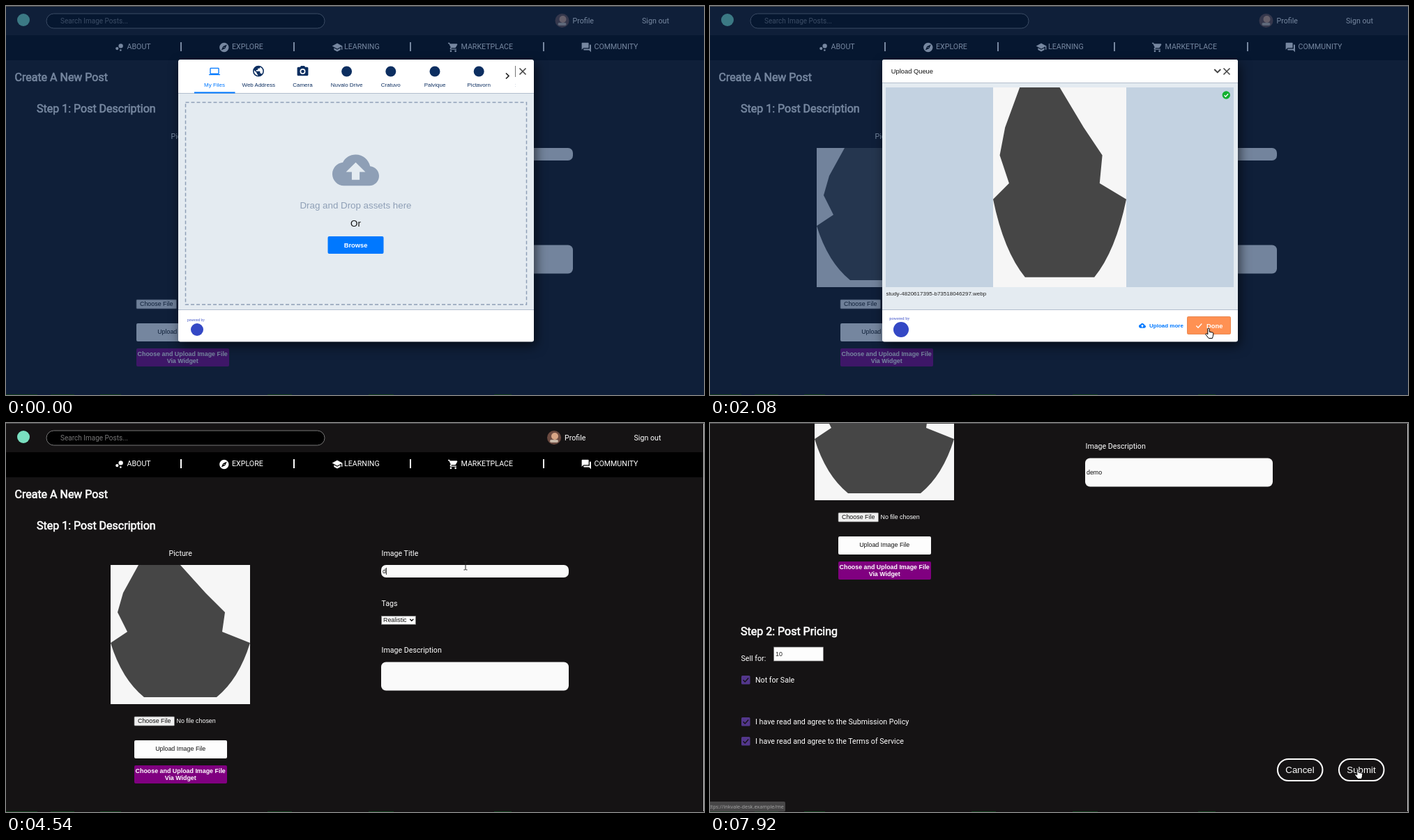
An HTML page that plays this animation: 1001x559 px, repeating every 8 s.

```html
<!DOCTYPE html>
<html lang="en">
<head>
<meta charset="utf-8">
<title>Create a post</title>
<style>
  html, body { margin: 0; width: 100%; height: 100%; overflow: hidden; background: #151314; }
  svg { display: block; }
  text { white-space: pre; }
  .ui { font-family: Roboto, sans-serif; }
  .sys { font-family: "Liberation Sans", Arial, sans-serif; }
  .head { font-family: Roboto, sans-serif; stroke: #fff; stroke-width: .6; }
  .status { font-family: "Open Sans", sans-serif; }
  .serif { font-family: "Liberation Serif", serif; }
  #modal { filter: drop-shadow(3px 6px 8px rgba(0, 0, 0, .6)); }
</style>
</head>
<body>
<svg id="stage" width="1001" height="559" viewBox="0 0 1001 559"></svg>
<script>
const LOOP = 8000, TICK = 120;
const NAVY = '#0c2e60', BLUE = '#0078ff', SLATE = '#8e9fb6', EM = 8.89;

const icons = {
  bubbles: 'M4 14.4a3.2 3.2 0 106.4 0 3.2 3.2 0 10-6.4 0zM12.8 18a2 2 0 104 0 2 2 0 10-4 0zM10.4 8.8a4.8 4.8 0 109.6 0 4.8 4.8 0 10-9.6 0z',
  compass: 'M12 10.9a1.1 1.1 0 100 2.2 1.1 1.1 0 100-2.2zM12 2a10 10 0 100 20 10 10 0 100-20zm2.2 12.2L6 18l3.8-8.2L18 6z',
  cap: 'M5 13.2v4L12 21l7-3.8v-4L12 17zM12 3L1 9l11 6 9-4.9V17h2V9z',
  cart: 'M7 18a2 2 0 100 4 2 2 0 100-4zM1 2v2h2l3.6 7.6-1.4 2.4C4.5 15.4 5.5 17 7 17h12v-2H7.4l1-2h7.4c.8 0 1.4-.4 1.8-1L21.2 5.5 20 4H5.2L4.3 2zM17 18a2 2 0 100 4 2 2 0 100-4z',
  forum: 'M21 6h-2v9H6v2c0 .6.4 1 1 1h11l4 4V7c0-.6-.4-1-1-1zm-4 6V3c0-.6-.4-1-1-1H3c-.6 0-1 .4-1 1v14l4-4h10c.6 0 1-.4 1-1z',
  cloud: 'M19.4 10C18.7 6.6 15.6 4 12 4 9.1 4 6.6 5.6 5.4 8 2.3 8.4 0 10.9 0 14c0 3.3 2.7 6 6 6h13c2.8 0 5-2.2 5-5 0-2.6-2-4.8-4.6-5zM14 13v4h-4v-4H7l5-5 5 5z',
  laptop: 'M20 18c1.1 0 2-.9 2-2V6c0-1.1-.9-2-2-2H4c-1.1 0-2 .9-2 2v10c0 1.1.9 2 2 2H0v2h24v-2zM4 6h16v10H4z',
  globe: 'M12 2a10 10 0 100 20 10 10 0 100-20zm-1 17.9A8 8 0 014.2 10.2L9 15v1c0 1.1.9 2 2 2zm6.9-2.5c-.3-.8-1-1.4-1.9-1.4h-1v-3c0-.6-.4-1-1-1H8v-2h2c.6 0 1-.4 1-1V7h2c1.1 0 2-.9 2-2v-.4a8 8 0 012.9 12.8z',
  camera: 'M9 2L7.2 4H4c-1.1 0-2 .9-2 2v12c0 1.1.9 2 2 2h16c1.1 0 2-.9 2-2V6c0-1.1-.9-2-2-2h-3.2L15 2zM12 7a5 5 0 100 10 5 5 0 100-10zm0 2a3 3 0 110 6 3 3 0 110-6z'
};

const text = (x, y, str, size, fill = '#fff', cls = 'sys', extra = '') =>
  `<text x="${x}" y="${y}" font-size="${size}" fill="${fill}" class="${cls}" ${extra}>${str}</text>`;
const mid = (x, y, str, size, fill, cls, extra = '') =>
  text(x, y, str, size, fill, cls, `text-anchor="middle" ${extra}`);
const rect = (x, y, w, h, fill, r = 0, extra = '') =>
  `<rect x="${x}" y="${y}" width="${w}" height="${h}" fill="${fill}" rx="${r}" ${extra}/>`;
const dot = (x, y, r, fill, extra = '') => `<circle cx="${x}" cy="${y}" r="${r}" fill="${fill}" ${extra}/>`;
const line = (d, color, w = 1.5) => `<path d="${d}" fill="none" stroke="${color}" stroke-width="${w}"/>`;
const icon = (name, x, y, size, fill = '#fff') =>
  `<path d="${icons[name]}" fill="${fill}" fill-rule="evenodd" transform="translate(${x} ${y}) scale(${size / 24})"/>`;
const group = (id, ...parts) => `<g id="${id}">${parts.join('')}</g>`;
const label = (x, y, str) => text(x, y, str, 10.667, '#fff', 'ui');
const heading = (x, y, str) => text(x, y, str, 16, '#fff', 'head');
const BOLD = 'font-weight="700"';

const menu = [
  ['bubbles', 154.5, 173.5, 'ABOUT'], ['compass', 304.8, 324, 'EXPLORE'], ['cap', 467, 485, 'LEARNING'],
  ['cart', 633.3, 652.5, 'MARKETPLACE'], ['forum', 824.3, 843.5, 'COMMUNITY']
];
const checkRow = (y, str) =>
  rect(45, y - 6, 12.5, 12.5, '#53378c', 1.5) + line(`M47.5 ${y + .3}l2.7 2.7 5-5.5`, '#151314', 1.4) +
  label(65, y + 4, str);
const pill = (x, str) =>
  rect(x + 1, 776, 64.5, 31, 'none', 15.5, 'stroke="#fff" stroke-width="2"') + mid(x + 33, 796, str, 13.33);
const photo = (id, x, y, w, h) =>
  `<svg id="${id}" x="${x}" y="${y}" width="${w}" height="${h}" viewBox="0 0 100 100" preserveAspectRatio="none">` +
  rect(0, 0, 100, 100, '#f6f6f6') +
  '<path d="M20 0H50L68 20 82 34 80 48 100 56Q92 82 76 95H24Q8 82 0 56L12 48 5 34 9 20Z" fill="#464646"/></svg>';

const page = group('page',
  rect(0, 0, 1001, 860, '#151314'),
  rect(0, 42, 1001, 36, '#000'),
  dot(25, 20, 9, '#7adfc0'),
  rect(58, 11, 399, 21, '#000', 10.5, 'stroke="#777"'),
  text(78, 25, 'Search Image Posts...', 10, '#777', 'ui'),
  group('account',
    dot(786, 21, 10, '#6b4a40'), dot(787, 19, 5, '#d9a585'), rect(780, 24, 12, 4, '#c9b8a8', 2),
    label(801, 25, 'Profile'), label(900.5, 25, 'Sign out')),
  menu.map(([name, ix, tx, str]) => icon(name, ix, 51.5, 16) + label(tx, 62, str)).join(''),
  [250, 412, 579, 770].map(x => rect(x, 52, 2, 13, '#fff')).join(''),
  heading(12.5, 108, 'Create A New Post'),
  heading(44, 153, 'Step 1: Post Description'),
  group('left',
    label(233.5, 191, 'Picture'),
    photo('picture', 150, 204, 200, 200),
    rect(184, 422, 57.5, 13, '#f0f0f0', 1, 'stroke="#767676" stroke-width=".7"'),
    text(189, 431, 'Choose File', EM, '#111'), text(244.5, 431, 'No file chosen', EM),
    rect(184, 456, 133, 26, '#fdfdfd', 2), mid(250.2, 471, 'Upload Image File', EM, '#111'),
    rect(184, 492, 133, 26, '#800080', 2),
    mid(250.2, 503, 'Choose and Upload Image File', EM, '#fff', 'sys', BOLD),
    mid(250.2, 513, 'Via Widget', EM, '#fff', 'sys', BOLD)),
  group('right',
    label(538.5, 191, 'Image Title'), rect(538, 204, 269, 18, '#fafafa', 7),
    text(540, 216, '', EM, '#111', 'sys', 'id="titleText"'),
    label(538.5, 263, 'Tags'),
    rect(538.5, 277.5, 49, 12, '#fff', 0, 'stroke="#767676" stroke-width=".8"'),
    text(541, 286, 'Realistic', EM, '#111'), line('M579.3 281.8l2.5 2.5 2.5-2.5', '#000', 1.3),
    label(538.5, 330, 'Image Description'), rect(538, 343.5, 269, 41, '#fafafa', 7),
    text(540, 367, '', EM, '#111', 'sys', 'id="descText"'),
    rect(0, 0, .8, 10, '#000', 0, 'id="caret"')),
  heading(44, 598, 'Step 2: Post Pricing'),
  label(44.5, 635, 'Sell for:'),
  rect(91.5, 615, 71, 20, '#fdfdfd', 0, 'stroke="#767676" stroke-width=".7"'), text(94, 628, '10', EM, '#222'),
  checkRow(662, 'Not for Sale'),
  checkRow(722, 'I have read and agree to the Submission Policy'),
  checkRow(750, 'I have read and agree to the Terms of Service'),
  pill(813, 'Cancel'), pill(901, 'Submit')
);

const tabs = ['My Files', 'Web Address', 'Camera', 'Nuvalo Drive', 'Cratuvo', 'Palvique', 'Pictavorn'];
const closeX = line('M736.5 89.5l9 9m0-9l-9 9', '#444', 1.6);
const badge = (x, size, y, r) =>
  text(x, y, 'powered by', size, '#3448c5', 'serif') + dot(274, 465, r, '#3448c5');

const picker = group('picker',
  rect(247, 125, 510, 1, '#b3bfcd'),
  tabs.map((str, i) => mid(299 + i * 63.2, 116, str, 8, i ? NAVY : BLUE) +
    (i > 2 ? dot(299 + i * 63.2, 94, 7.5, NAVY) : '')).join(''),
  icon('laptop', 291, 86, 16, BLUE), icon('globe', 352.5, 84.2, 19, NAVY), icon('camera', 416, 84.5, 19, NAVY),
  rect(270, 123.5, 58.5, 2, BLUE),
  text(729.5, 116, ':', 8, '#bbc4d0'), line('M717 96.5l4 4-4 4', '#222', 1.7),
  rect(730, 86, 1, 16, '#777'), closeX,
  rect(257.5, 138.5, 489, 290.5, 'none', 0, `stroke="${SLATE}" stroke-width="1.5" stroke-dasharray="5 3"`),
  icon('cloud', 468, 202.3, 67, SLATE),
  mid(501.5, 291, 'Drag and Drop assets here', 13.33, SLATE), mid(501.5, 317, 'Or', 13.33, '#111'),
  rect(461.5, 331, 80, 25, BLUE, 2), mid(501.5, 347, 'Browse', 9.33, '#fff', 'sys', BOLD),
  badge(260, 5.3, 452.5, 9)
);

const queue = group('queue',
  rect(247, 77, 510, 33, '#fff', 3), rect(247, 110, 510, 1, '#b3bfcd'), rect(247, 111, 510, 20, '#e4ebf1'),
  group('busy', mid(270.3, 95, '0%', 6, BLUE, 'sys', `id="percent" ${BOLD}`),
    text(287, 97, 'Uploading 1 Assets', 9.33, '#111')),
  text(259.8, 97, 'Upload Queue', 9.33, '#111', 'sys', 'id="ready"'),
  line('M723.3 91l4.5 4.5 4.5-4.5', '#444', 1.9), closeX,
  rect(252, 117, 499, 287, '#c3d2e1'),
  rect(478, 237, 47, 46.5, '#8faac8', 4, 'id="halo"'),
  group('pending',
    rect(482.5, 244, 38, 34, '#566776', 2), '<path d="M484 276l9-10 6 6 9-9 11 13z" fill="#788690"/>',
    dot(501.5, 260, 6.5, 'none', 'stroke="#fff" stroke-width="1.4"'), line('M500 257v6m3-6v6', '#fff', 1.3),
    rect(252, 373, 499, 31, 'url(#fade)'),
    rect(256, 393.5, 6.5, 6, '#fff', 1), '<path d="M257 398.5l1.5-2 1 1 1.2-1.8 1.3 2.8z" fill="#555"/>',
    text(265, 399, 'WEBP', 6.67, '#fff', 'sys', BOLD),
    text(748, 399, '102.39 KB', 6.67, '#fff', 'sys', `text-anchor="end" ${BOLD}`)),
  photo('preview', 406, 117, 191, 287),
  dot(740.3, 128, 5.7, '#fff', 'id="mark"'),
  group('tick', line('M737.5 128.2l2 2 3.6-4', '#fff', 1.3)),
  text(252.5, 416, 'study-4820617395-b73518046297.webp', 8, '#222'),
  badge(257.3, 6.2, 451.2, 11),
  group('abort', dot(567.5, 459.3, 3.5, 'none', `stroke="${BLUE}"`),
    line('M566.2 458l2.6 2.6m0-2.6l-2.6 2.6', BLUE, .9),
    text(577.5, 462, 'Abort all', 8, BLUE, 'sys', BOLD)),
  icon('cloud', 615, 454.3, 10, BLUE), text(630, 462, 'Upload more', 8, BLUE, 'sys', BOLD),
  rect(684, 446, 63, 26, '#ffb184', 2),
  rect(684.5, 446.5, 62, 25, '#ff620c', 2, 'id="hot" stroke="#c84a06"'),
  line('M697.3 459.5l2.7 2.7 5.3-5.7', '#fff', 1.3), text(712, 463, 'Done', 9.33, '#fff', 'sys', BOLD)
);

const status = group('status', rect(-4, 544, 112, 14.5, '#474647', 2),
  text(-1, 554, 'ttps://inkvale-desk.example/me', 7.3, '#a8a8a8', 'status'));
const edge = [[0, 45], [64, 98], [135, 165], [375, 410], [520, 556], [700, 725]]
  .map(([a, b]) => rect(a, 558, b - a, 1, '#123f1d')).join('');

const pointers = group('pointer',
  '<path id="arrow" d="M0 0V11.5L2.7 9 4.5 13 6.4 12.2 4.7 8.3H8.2Z" fill="#fff" stroke="#000" stroke-width=".8"/>',
  '<path id="hand" d="M-1.2 9V1.2Q-1.2 0 0 0T1.2 1.2V5.2L5.8 6.2Q7 6.5 6.9 7.8L6.3 11.6 5.4 14.5H.2L-4 9.2Q-4.6 8-3.4 7.7-2.4 7.5-1.2 9Z" fill="#fff" stroke="#000"/>',
  '<path id="beam" d="M-2.5-6H-.7L0-5.3.7-6H2.5M0-5.3V5.3M-2.5 6H-.7L0 5.3.7 6H2.5" fill="none" stroke="#222"/>');

const stage = document.getElementById('stage');
stage.innerHTML =
  '<linearGradient id="fade" x2="0" y2="1"><stop stop-color="#555" stop-opacity="0"/><stop offset="1" stop-color="#555"/></linearGradient>' +
  page + rect(1000, 0, 1, 558, '#c8c8c8', 0, 'id="scrollbar"') +
  group('dialog', rect(0, 0, 1001, 559, '#0c2a57', 0, 'opacity=".56"'),
    group('modal', rect(247, 77, 510, 405.5, '#fff', 3), rect(247, 125, 510, 311, '#e4ebf1'),
      rect(247, 436, 510, 1, '#b3bfcd'), picker, queue)) +
  rect(0, 0, 1001, 1, '#4b4b4d') + edge + status + pointers;

const ui = {};
stage.querySelectorAll('[id]').forEach(el => ui[el.id] = el);

// Value rows: [time, value], held until the next row.
const scrollRows = [[0, 0], [6960, 46], [7080, 138], [7200, 230], [7320, 293]];
const pendingRows = [[0, 1], [1380, .5], [1500, 0]];
const hotRows = [[0, 0], [2080, .4], [2200, .8], [2320, 1]];
const statusRows = [[0, 0], [7800, .6], [7920, 1]];
const titleKeys = [4540, 4940, 5060, 5180];
const descKeys = [5780, 5930, 6200, 6320];

// Pointer rows: [start, ticks, shape, x, y].
const moves = [
  [0, 1, '', 707, 456], [1260, 1, 'arrow', 707, 456], [1380, 2, 'arrow', 711, 462],
  [2080, 1, 'hand', 715, 463], [2880, 1, 'hand', 711, 459], [3250, 1, 'arrow', 711, 460],
  [3400, 5, 'arrow', 656, 197], [3890, 1, 'beam', 659, 204], [4170, 1, 'beam', 659, 205],
  [5300, 2, 'arrow', 664, 330], [5540, 1, 'beam', 664, 355], [6440, 3, 'arrow', 718, 268],
  [6960, 1, 'arrow', 718, 277], [7440, 3, 'arrow', 927, 500], [7800, 1, 'hand', 929, 497]
];

const ease = p => p * p * (3 - 2 * p);
const held = (rows, t) => rows.filter(r => r[0] <= t).pop()[1];
const typed = (keys, t) => 'demo'.slice(0, keys.filter(k => k <= t).length);
const show = (name, on) => { ui[name].style.display = on ? '' : 'none'; };
const shift = (name, x, y) => ui[name].setAttribute('transform', `translate(${x} ${y})`);

function movePointer(t) {
  const i = moves.filter(m => m[0] <= t).length - 1;
  const [start, ticks, shape, x, y] = moves[i];
  const from = moves[Math.max(i - 1, 0)];
  const p = ease(Math.min(1, (Math.floor((t - start) / TICK) + 1) / ticks));
  shift('pointer', from[3] + (x - from[3]) * p, from[4] + (y - from[4]) * p);
  ['arrow', 'hand', 'beam'].forEach(s => show(s, s === shape));
}

function render(t) {
  const open = t < 3250, done = t >= 2080, loaded = t >= 1650;
  show('dialog', open);
  show('scrollbar', !open);
  show('picker', t < 1260);
  show('queue', t >= 1260);
  show('busy', !done);
  show('ready', done);
  show('abort', !done);
  show('tick', done);
  show('picture', done);
  show('preview', loaded);
  show('halo', !loaded);
  ui.percent.textContent = loaded ? '100%' : '0%';
  ui.mark.setAttribute('fill', done ? '#12b030' : '#fff');
  ui.pending.style.opacity = held(pendingRows, t);
  ui.hot.style.opacity = held(hotRows, t);
  ui.status.style.opacity = held(statusRows, t);

  // The page is wider while the dialog hides its scrollbar.
  shift('left', open ? 3 : 0, 0);
  shift('right', open ? 6 : 0, 0);
  shift('account', open ? 11.5 : 0, 0);
  shift('page', 0, -held(scrollRows, t));

  ui.titleText.textContent = typed(titleKeys, t);
  ui.descText.textContent = typed(descKeys, t);
  const inDesc = t >= 5660, field = inDesc ? ui.descText : ui.titleText;
  show('caret', t >= 4290 && t < 6560);
  shift('caret', 540 + field.getComputedTextLength(), inDesc ? 359 : 208);
  movePointer(t);
}

const begin = performance.now();
function loop() {
  render((performance.now() - begin) % LOOP);
  requestAnimationFrame(loop);
}
loop();
</script>
</body>
</html>
```
